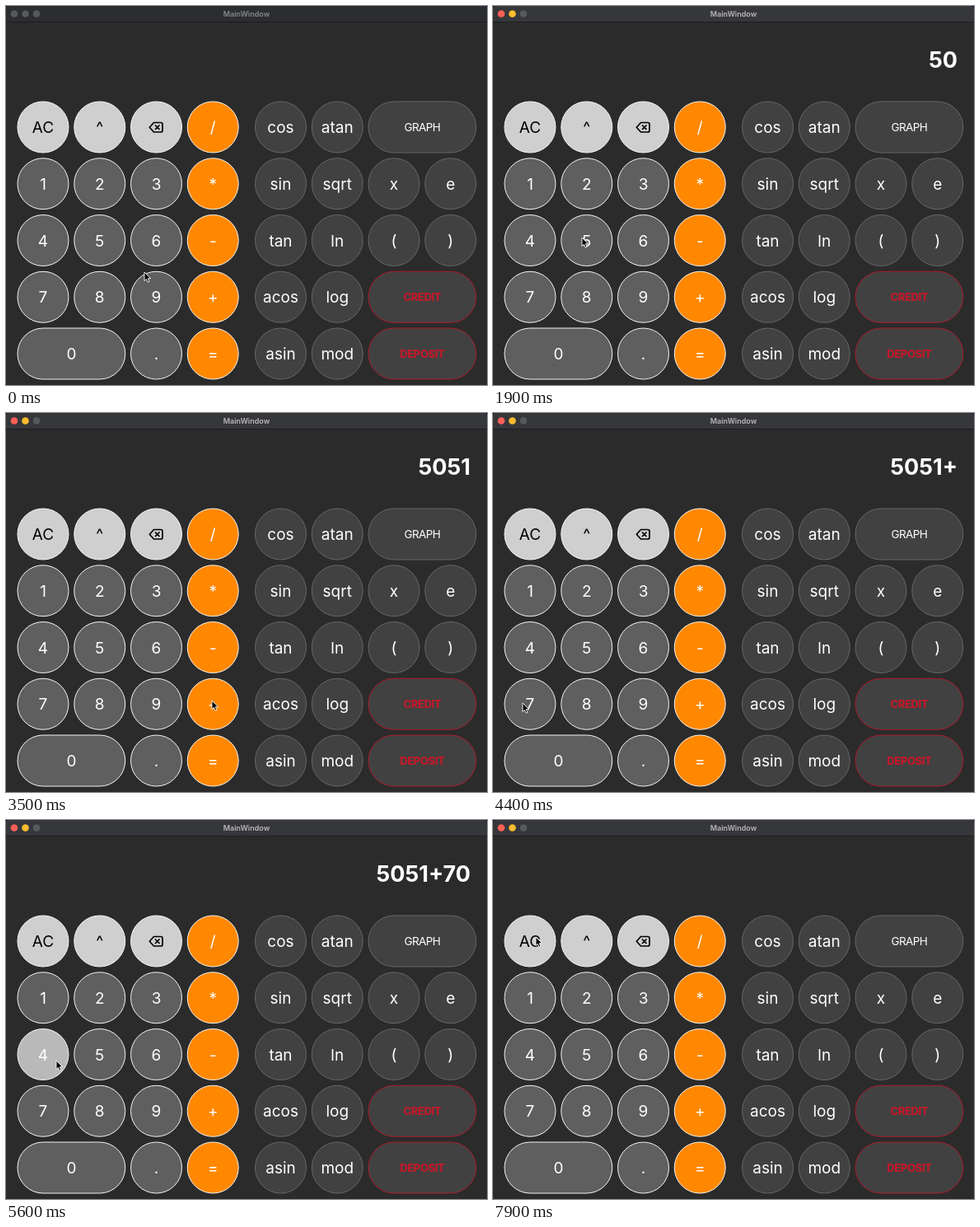
Write an HTML page that moves like this. It is 584 by 460 pixels and loops after 8 s.

```html
<!DOCTYPE html>
<html lang="en">
<head>
<meta charset="utf-8">
<title>Calculator</title>
<style>
  html, body { margin: 0; width: 100%; height: 100%; overflow: hidden; background: #14203f; }
  svg { display: block; width: 584px; height: 460px; font-family: Inter, "Open Sans", sans-serif; }
  .keys text { font-size: 19px; text-anchor: middle; fill: #fff; }
  .digit rect { fill: #5f5f5f; stroke: #f4f4f4; }
  .light rect { fill: #cfcfcf; stroke: #f4f4f4; }
  .keys .light text { fill: #000; }
  .orange rect { fill: #ff8800; stroke: #f4f4f4; }
  .dark rect { fill: #414141; stroke: #666; }
  .red rect { fill: #414141; stroke: #a81c2b; }
  .keys .red text { fill: #c01a2a; font-size: 13px; font-weight: 800; letter-spacing: -.4px; }
  .keys .small text { font-size: 13.5px; letter-spacing: -.6px; }
  .digit.down rect { fill: #b9b9b9; }
  .light.down rect { fill: #f0f0f0; }
  .orange.down rect { fill: #ffb866; }
  #title { font-size: 9px; font-weight: 600; text-anchor: middle; }
  #display { font-size: 27px; font-weight: 700; text-anchor: end; fill: #fff; }
</style>
</head>
<body>
<svg viewBox="0 0 584 460">
  <path d="M0 460V5Q0 0 5 0H579Q584 0 584 5V460Z" fill="#2b2b2b"/>
  <path id="bar" d="M0 19V5Q0 0 5 0H579Q584 0 584 5V19Z"/>
  <path d="M0 19.5H584" stroke="#1d1d1e"/>
  <g id="lights"><circle cx="10" cy="9.5" r="4.3"/><circle cx="23.5" cy="9.5" r="4.3"/><circle cx="37" cy="9.5" r="4.3"/></g>
  <text id="title" x="292" y="12.7">MainWindow</text>
  <text id="display" x="564" y="75"></text>
  <g class="keys" id="keys"></g>
  <path d="M179.5 141.5H188Q190 141.5 190 143.5V151Q190 153 188 153H179.5L174.3 147.2ZM181 144.5L186.5 150M186.5 144.5L181 150"
        fill="none" stroke="#000" stroke-width="1.7" stroke-linejoin="round"/>
  <path id="cursor" d="M0 0V10.6L2.4 8.4L4.1 12.2L6 11.4L4.3 7.7H7.6Z" fill="#000" stroke="#fff" stroke-width=".9"/>
</svg>
<script>
const $ = id => document.getElementById(id);
const SVG = "http://www.w3.org/2000/svg";
const LOOP = 8000, STEP = 100, PITCH = 68.75;
const keys = {};

function make(tag, parent, attributes) {
  const node = document.createElementNS(SVG, tag);
  for (const name in attributes) node.setAttribute(name, attributes[name]);
  return parent.appendChild(node);
}

function addKey(label, kind, column, row, span = 1) {
  const x = (column < 4 ? 14 : 27.5) + column * PITCH, y = 116 + row * PITCH;
  const width = 62 + (span - 1) * PITCH;
  const group = make("g", $("keys"), { class: kind });
  make("rect", group, { x, y, width, height: 62, rx: 31 });
  const baseline = y + (/red|small/.test(kind) ? 35.8 : 38);
  make("text", group, { x: x + width / 2, y: baseline }).textContent = label;
  keys[label] = group;
}

["AC", "^", ""].forEach((label, i) => addKey(label, "light", i, 0));
for (let n = 1; n <= 9; n++) addKey(n, "digit", (n - 1) % 3, Math.ceil(n / 3));
addKey("0", "digit", 0, 4, 2);
addKey(".", "digit", 2, 4);
[..."/*-+="].forEach((label, row) => addKey(label, "orange", 3, row));
["cos", "sin", "tan", "acos", "asin"].forEach((label, row) => addKey(label, "dark", 4, row));
["atan", "sqrt", "ln", "log", "mod"].forEach((label, row) => addKey(label, "dark", 5, row));
[..."xe()"].forEach((label, i) => addKey(label, "dark", 6 + i % 2, 1 + (i >> 1)));
addKey("GRAPH", "dark small", 6, 0, 2);
addKey("CREDIT", "red", 6, 3, 2);
addKey("DEPOSIT", "red", 6, 4, 2);

const ACTIVATE = 700;
// press time, release time, key, display after release
const presses = [
  [1000, 1100, "5", "5"], [1500, 1600, "0", "50"], [2000, 2100, "5", "505"],
  [2500, 2600, "1", "5051"], [3800, 3900, "+", "5051+"], [4600, 4700, "7", "5051+7"],
  [5100, 5200, "0", "5051+70"], [5600, 5700, "4", "5051+704"],
  [6400, 6500, "=", "5755"], [7600, 7700, "AC", ""]
];
// time, x, y of the pointer tip
const path = [
  [0, 168, 323], [400, 110, 284], [1100, 110, 284], [1500, 85, 430], [1600, 85, 430],
  [1900, 108, 281], [2100, 108, 281], [2400, 54, 217], [2700, 54, 217],
  [3300, 270, 431], [3500, 250, 349], [3900, 250, 349], [4400, 36, 352], [4700, 40, 354],
  [5000, 86, 431], [5200, 86, 431], [5500, 61, 292], [5700, 61, 292],
  [6200, 250, 426], [6500, 252, 426], [6900, 386, 344], [7300, 118, 160],
  [7500, 52, 142], [LOOP, 52, 142]
];

function pointerAt(time) {
  const i = path.findIndex(point => point[0] > time);
  const [t0, x0, y0] = path[i - 1], [t1, x1, y1] = path[i];
  const u = (time - t0) / (t1 - t0), ease = u * u * (3 - 2 * u);
  return [x0 + (x1 - x0) * ease, y0 + (y1 - y0) * ease];
}

function render(time) {
  const active = time >= ACTIVATE;
  $("bar").setAttribute("fill", active ? "#36373b" : "#2c2d30");
  $("title").setAttribute("fill", active ? "#b9b9bb" : "#87888a");
  const colors = active ? ["#ff5f57", "#febc2e", "#58595c"] : Array(3).fill("#57585a");
  [...$("lights").children].forEach((light, i) => light.setAttribute("fill", colors[i]));

  const done = presses.filter(press => time >= press[1]).pop();
  $("display").textContent = done ? done[3] : "";
  const held = presses.find(([down, up]) => time >= down && time < up);
  for (const label in keys) keys[label].classList.toggle("down", !!held && held[2] === label);
  $("cursor").setAttribute("transform", `translate(${pointerAt(time)})`);
}

const start = performance.now();
function frame() {
  const time = (performance.now() - start) % LOOP;
  render(Math.floor(time / STEP) * STEP);
  requestAnimationFrame(frame);
}
frame();
</script>
</body>
</html>
```
